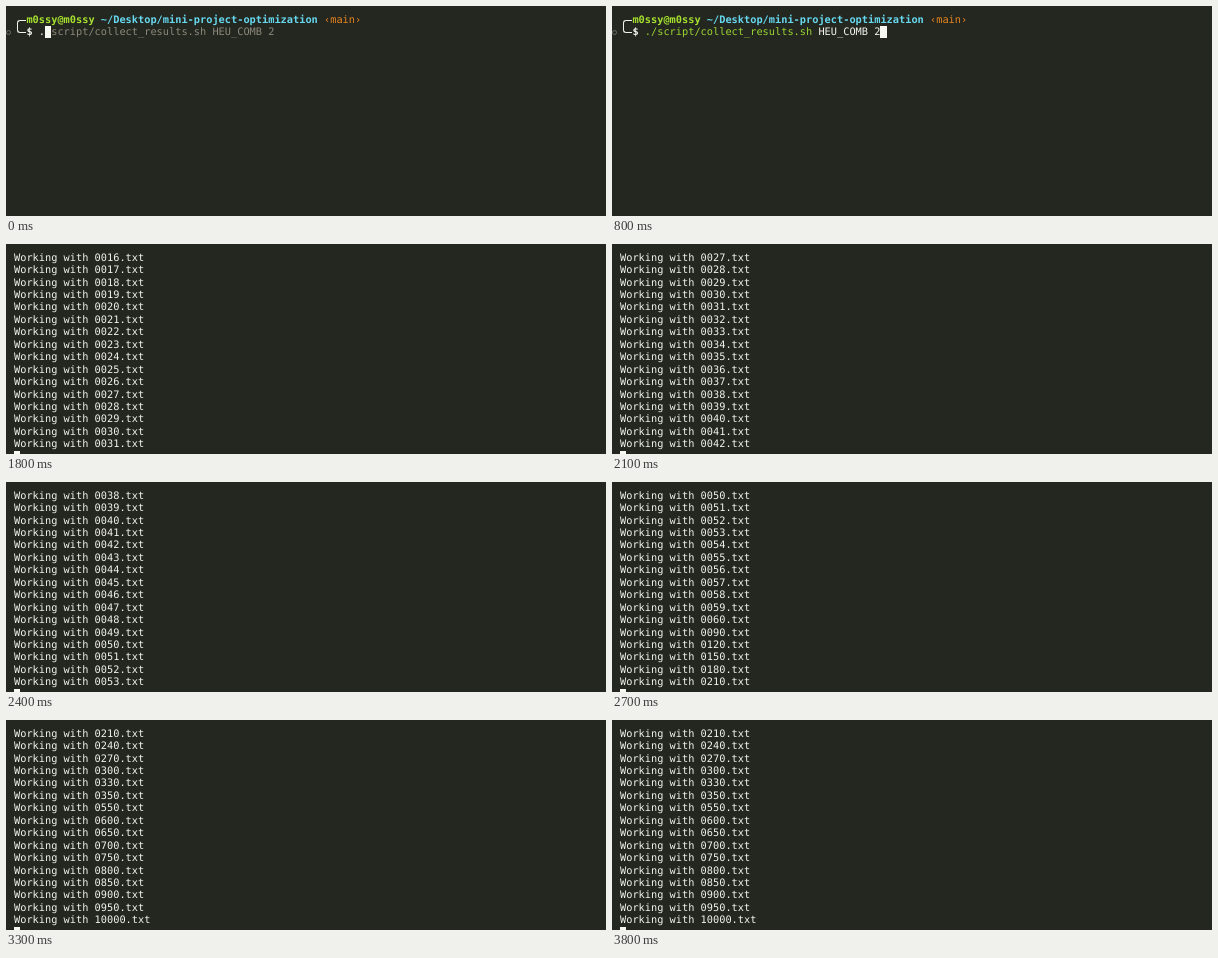
Write an HTML page that moves like this. It is 600 by 210 pixels and loops after 5100 ms.

```html
<!DOCTYPE html>
<html lang="en">
<head>
<meta charset="utf-8">
<title>Terminal session</title>
<style>
  html, body { margin: 0; width: 100%; height: 100%; overflow: hidden; background: #242620; }
  #screen {
    position: relative; width: 600px; height: 210px; overflow: hidden;
    color: #f4f4ee;
    font: 10.3px/12.45px "DejaVu Sans Mono", monospace;
    text-rendering: geometricPrecision;
    font-variant-ligatures: none;
  }
  .row { position: absolute; left: 8px; height: 12.45px; white-space: pre; }
  .user { color: #a6e22e; }
  .path { color: #66d9ef; }
  .branch { color: #e8861f; }
  .command { color: #9ad532; }
  .hint { color: #8b897b; }
  .cursor { position: absolute; width: 6.2px; height: 12.45px; background: #f8f8f2; }
  .corner { position: absolute; left: 3px; width: 9px; border: 0 solid #f0f0ea; box-sizing: border-box; }
  .upper { top: 6px; height: 7px; border-width: 1px 0 0 1px; border-top-left-radius: 3px; }
  .lower { top: 0; height: 7px; border-width: 0 0 1px 1px; border-bottom-left-radius: 3px; }
  .mark { position: absolute; left: -8px; top: 4px; width: 3px; height: 3px; border: 1px solid #6b6c66; border-radius: 50%; }
</style>
</head>
<body>
<div id="screen"></div>
<script>
const LOOP = 5100, STEP = 100;
const LEFT = 8, TOP = 7.6, CELL = 6.2, PITCH = 12.45, LAST_ROW = 16;
const PROGRAM = './script/collect_results.sh', ARGS = ' HEU_COMB 2';
const COMMAND = PROGRAM + ARGS;
const screen = document.getElementById('screen');

const range = (from, to, step) =>
  Array.from({ length: (to - from) / step + 1 }, (_, i) => from + i * step);
const span = (name, text) => `<span class="${name}">${text}</span>`;

const numbers = [...range(10, 60, 1), ...range(90, 330, 30), 350, ...range(550, 950, 50), 10000];
const names = ['0007(sample_data)', ...numbers.map(n => String(n).padStart(4, '0'))];
const output = names.map(name => `Working with ${name}.txt`);

const header = span('corner upper', '') + '  <b>' + span('user', 'm0ssy@m0ssy') + ' ' +
  span('path', '~/Desktop/mini-project-optimization') + '</b> ' + span('branch', '‹main›');

// Printed lines over time, as [ms, lines]
const progress = [[1200, -1], [1800, 23], [2400, 45], [3000, 68], [3100, 72]];

function printedLines(t) {
  if (t < 1300) return 0;
  const next = progress.findIndex(([time]) => time >= t);
  if (next < 0) return output.length;
  const [t0, n0] = progress[next - 1], [t1, n1] = progress[next];
  return Math.round(n0 + (n1 - n0) * (t - t0) / (t1 - t0));
}

function typedLength(t) {
  return t < 100 ? 1 : t < 300 ? 4 : COMMAND.length;
}

function promptLine(typed) {
  const text = typed < COMMAND.length
    ? COMMAND.slice(0, typed) + span('hint', COMMAND.slice(typed))
    : span('command', PROGRAM) + ARGS;
  return span('mark', '') + span('corner lower', '') + '  <b>$</b> ' + text;
}

function render(t) {
  const count = printedLines(t), typed = typedLength(t);
  const rows = [header, promptLine(typed), ...output.slice(0, count)];
  const cursorRow = count ? rows.length : 1;
  const cursorColumn = count ? 0 : 4 + typed;
  const scroll = Math.max(0, cursorRow - LAST_ROW);
  const y = row => TOP + (row - scroll) * PITCH;

  screen.innerHTML = rows.slice(scroll)
    .map((html, i) => `<div class="row" style="top:${y(i + scroll)}px">${html}</div>`)
    .join('') +
    `<div class="cursor" style="left:${LEFT + cursorColumn * CELL}px;top:${y(cursorRow)}px"></div>`;
}

const start = performance.now();
let shown = -1;

function tick() {
  const elapsed = (performance.now() - start) % LOOP;
  const time = Math.floor(elapsed / STEP) * STEP;
  if (time !== shown) render(shown = time);
  requestAnimationFrame(tick);
}
tick();
</script>
</body>
</html>
```
